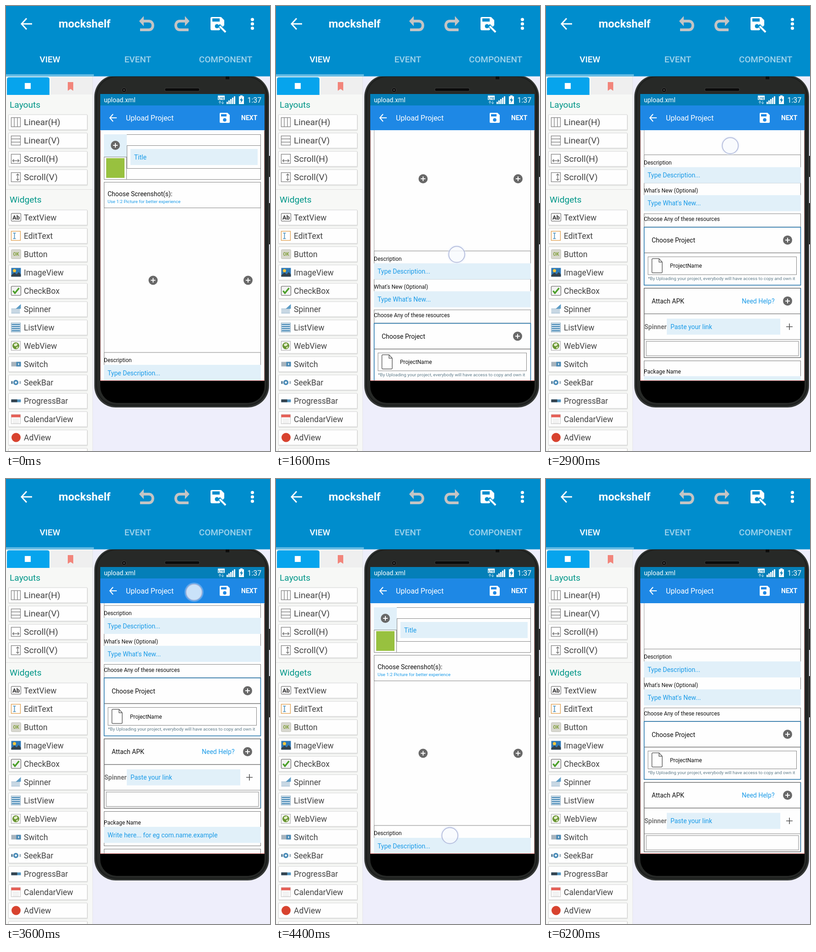
These frames come from a looping animation (577x971 px, 7700 ms). An HTML page:

```html
<!DOCTYPE html>
<html lang="en">
<head>
<meta charset="utf-8">
<title>Layout editor</title>
<style>
  html, body { margin: 0; width: 100%; height: 100%; overflow: hidden; background: #eeeefb; }
  svg { display: block; }
  text { font-family: Roboto, sans-serif; white-space: pre; }
</style>
</head>
<body>
<svg id="stage" width="577" height="971" viewBox="0 0 577 971"></svg>
<script>
const INK = '#111', HINT = '#1a9be8', FIELD = '#e1f0f9', LINE = '#858585', BLUE = '#2a78ad';

const rect = (x, y, w, h, fill, more = '') =>
  `<rect x="${x}" y="${y}" width="${w}" height="${h}" fill="${fill}" ${more}/>`;
const text = (x, y, s, size, fill = INK, more = '') =>
  `<text x="${x}" y="${y}" font-size="${size}" fill="${fill}" ${more}>${s}</text>`;
const dot = (x, y, r, fill, more = '') =>
  `<circle cx="${x}" cy="${y}" r="${r}" fill="${fill}" ${more}/>`;
const line = (d, stroke = LINE, w = 1, more = '') =>
  `<path d="${d}" fill="none" stroke="${stroke}" stroke-width="${w}" ${more}/>`;
const shape = (d, fill) => `<path d="${d}" fill="${fill}"/>`;
const box = (x1, y1, x2, y2, stroke = LINE, w = 1) =>
  rect(x1 + .5, y1 + .5, x2 - x1 - 1, y2 - y1 - 1, 'none', `stroke="${stroke}" stroke-width="${w}"`);
const plus = (x, y) => dot(x, y, 10, '#686868') +
  line(`M${x - 5} ${y}h10M${x} ${y - 5}v10`, '#fff', 2);
const field = (x, y, w, hint) => rect(x, y, w, 35, FIELD) + text(x + 8, y + 22.5, hint, 14, HINT);
const backArrow = (x, y, r, w) =>
  line(`M${x + r} ${y}H${x - r + 1}M${x} ${y - r}L${x - r + 1} ${y}L${x} ${y + r}`, '#fff', w);

function header() {
  const undo = shape('M291 33L301 22V44Z', '#c4c4c4') +
    line('M299 33H312C324 33 324 52 312 52H293', '#c4c4c4', 6);
  const tab = (x, s, alpha) => text(x, 122.5, s, 19, '#fff',
    `text-anchor="middle" font-weight="500" fill-opacity="${alpha}"`);
  return rect(0, 0, 577, 153.5, '#008dcd') + backArrow(45, 39, 12, 3) +
    text(115, 47, 'mockshelf', 24, '#fff', 'font-weight="700"') +
    undo + `<g transform="matrix(-1 0 0 1 692 0)">${undo}</g>` +
    shape('M450 24H470L477 31V42L466 53H450Q447 53 447 50V27Q447 24 450 24Z', '#fff') +
    rect(451, 27, 16, 7, '#008dcd') + dot(461, 44, 4.5, '#008dcd') +
    line('M465 42L478 55', '#008dcd', 7) + line('M467 44L480 57', '#fff', 4) +
    [29.5, 39, 48.5].map(y => dot(538.5, y, 3.6, '#fff')).join('') +
    tab(96, 'VIEW', 1) + tab(288, 'EVENT', .62) + tab(480, 'COMPONENT', .62) +
    rect(0, 149, 192, 4.5, '#66bce4');
}

// Icons are drawn around their own centre.
const frame = (fill = '#fff', stroke = '#888') =>
  rect(-10, -10, 20, 20, fill, `stroke="${stroke}" stroke-width="1.4"`);
const layouts = {
  'Linear(H)': frame() + line('M-3.5 -10V10M3.5 -10V10', '#888', 1.4),
  'Linear(V)': frame() + line('M-10 -3.5H10M-10 3.5H10', '#888', 1.4),
  'Scroll(H)': frame() + line('M-7 4H7M-4 1L-7 4L-4 7M4 1L7 4L4 7', '#777', 1.5),
  'Scroll(V)': frame() + line('M4 -7V7M1 -4L4 -7L7 -4M1 4L4 7L7 4', '#777', 1.5)
};
const widgets = {
  TextView: rect(-10, -9, 21, 17, '#fafafa', 'rx="2" stroke="#888" stroke-width="1.4"') +
    text(.5, 4.5, 'Ab', 13, '#333', 'text-anchor="middle" font-weight="700"'),
  EditText: frame('#fff', '#e0a458') + line('M-6 -6H0M-3 -6V6M-6 6H0', '#4b90bd', 1.6),
  Button: rect(-10, -10, 21, 20, '#d8d8cf', 'rx="2" stroke="#c2c2ba"') +
    text(.5, 3.5, 'OK', 10, '#86a343', 'text-anchor="middle" font-weight="700"'),
  ImageView: rect(-10, -10, 21, 19, '#2f79b5') + dot(-3, -4, 3.5, '#f5c63c') +
    shape('M-10 6L-3 0L2 4L6 -1L11 4V9H-10Z', '#33424e'),
  CheckBox: rect(-10, -10, 21, 20, '#f3f3f3', 'rx="2" stroke="#888" stroke-width="1.6"') +
    line('M-6 0L-2 5L7 -6', '#4a9f28', 3.5),
  Spinner: line('M-10 0H9M-10 4H9M-10 8H9', '#8fb0c8', 1.8) + shape('M0 -1L11 -11V-1Z', '#5c9cc5'),
  ListView: frame('#eaf3f9', '#9fb9ca') + line('M-9 -6.5H9M-9 -2H9M-9 2.5H9M-9 7H9', '#4688b5', 2.4),
  WebView: frame('#f7f7f7', '#bbb') + dot(0, 0, 7.5, '#689532') +
    shape('M-4 -4L2 -6L4 -2L0 1L-4 0ZM1 3L5 1L4 5L1 6Z', '#e3ecc8'),
  Switch: rect(-10, -5, 21, 10, '#a8b4bd') + rect(1, -5, 10, 10, '#4b8ab5') + rect(5, -2, 2, 4, '#fff'),
  SeekBar: rect(-10, -3, 3, 6, '#456f8d') + rect(8, -3, 3, 6, '#9cadb9') +
    dot(0, 0, 4, '#fff', 'stroke="#4d8db8" stroke-width="3.5"'),
  ProgressBar: rect(-10, -3, 21, 6, '#5194bf') + rect(-10, -3, 13, 6, '#33424e'),
  CalendarView: frame('#fff', '#cfcfcf') + rect(-10, -10, 20, 6, '#e55f56') +
    line('M-7 0H7M-7 4H7M-7 8H7', '#ddd', 1.4),
  AdView: dot(.5, 0, 10, '#d8432f')
};

function sidebar() {
  const card = y => rect(5, y + 1, 174, 35, '#000', 'rx="2" fill-opacity=".08"') +
    rect(5.5, y + .5, 172, 33, '#fefefe', 'rx="1" stroke="#d2d2d2"');
  const rows = (set, top, size) => Object.entries(set).map(([name, icon], i) => {
    const y = top + 40 * i;
    return card(y) + `<g transform="translate(21.5 ${y + 17})">${icon}</g>` +
      text(39, y + 23.5, name, size, '#444');
  }).join('');
  return rect(0, 153, 190, 818, '#f7f8f6') + rect(189, 153, 1, 818, '#e4e4e8') +
    rect(98, 156, 91, 37, '#efefef') +
    shape('M2 194V160Q2 155.500 7 155.500H90Q95 155.500 95 160V194Z', '#06a4ed') +
    rect(41, 168, 13, 13, '#fff') +
    shape('M135 166H147V185L141 181L135 185Z', '#f2857b') +
    text(8, 221.500, 'Layouts', 19.2, '#009688') + rows(layouts, 236.5, 19.2) +
    rect(0, 400, 189, 1, '#dedede') +
    text(8, 429, 'Widgets', 19.2, '#009688') + rows(widgets, 444.5, 17.6) + card(964.5);
}

function phone() {
  const bars = [0, 1, 2, 3, 4].map(i => rect(482 + 4 * i, 209 - 3 * i, 3, 5 + 3 * i, '#fff')).join('');
  return rect(573, 327, 4, 46, '#222') + rect(573, 430, 4, 90, '#222') +
    rect(193, 151, 382, 725, '#343735', 'rx="47"') +
    rect(196, 153, 376, 720, '#1c1e1d', 'rx="45"') +
    rect(199, 155, 370, 715, '#272927', 'rx="43"') +
    rect(206, 780, 359, 86, '#000', 'rx="36"') + rect(206, 780, 359, 40, '#000') +
    rect(480, 153, 8, 7, '#0c0d0c') +
    dot(258, 183.5, 5, '#111', 'stroke="#444"') + dot(258, 183.5, 1.8, '#4a4a4a') +
    rect(347, 179, 76, 7, '#0a0a0a', 'rx="3" stroke="#3c3c3c"') +
    rect(206, 192, 359, 25, '#047fb8') + text(214, 210, 'upload.xml', 14, '#fff') +
    rect(463, 195.500, 15, 9.500, '#fff') + text(470.5, 203.5, 'LTE', 8, '#047fb8', 'text-anchor="middle" font-weight="700"') +
    line('M467.500 214V208M465 210.500L467.500 207.500L470 210.500M473.500 207V213M471 210.500L473.500 213.500L476 210.500', '#8dc6e0', 1.3) +
    bars + rect(512, 195, 5, 3, '#fff') + rect(509, 197, 11, 17, '#fff') +
    shape('M516 199L511 206H514L513 212L518 204H515Z', '#047fb8') +
    text(527.5, 210.5, '1:37', 16, '#fff') +
    rect(206, 217, 359, 54.5, '#1e88e5') + backArrow(234, 244, 8, 2) +
    text(262, 249.500, 'Upload Project', 16, '#fff') +
    shape('M469 233H484L489 238V253Q489 255 487 255H469Q467 255 467 253V235Q467 233 469 233Z', '#fff') +
    rect(470, 236, 12, 5, '#1e88e5') + dot(478, 248.500, 3.8, '#1e88e5') +
    text(514, 249, 'NEXT', 14, '#fff', 'font-weight="700"');
}

function form() {
  return box(214, 280, 557, 379) + box(214, 329, 264, 379) + rect(214, 280, 50, 49, FIELD) + plus(239, 304) +
    rect(219, 332, 40, 43, '#98c13f') +
    box(264, 304, 557, 355) + field(272, 312, 278, 'Title') +
    box(214, 384, 557, 441) + text(222, 415, 'Choose Screenshot(s):', 14) +
    text(222, 430, 'Use 1:2 Picture for better experience', 9.9, HINT) +
    line('M214.500 441V756M556.500 441V756', '#a5a5a5') + plus(321.5, 598.5) + plus(529, 598.5) +
    box(214, 755.5, 557, 818) + text(214, 777, 'Description', 12) + field(214, 783, 343, 'Type Description...') +
    line('M214.500 818V844M556.500 818V844') + text(214, 838.5, "What's New (Optional)", 12) +
    field(214, 844, 343, "Type What's New...") +
    box(214, 884, 557, 914) + text(214, 900.5, 'Choose Any of these resources', 12) +
    box(214, 913.5, 557, 1041, BLUE, 1.6) + text(231, 947.5, 'Choose Project', 14) + plus(528, 942) +
    line('M215 970H556', '#777', 1.3) + box(222.5, 978, 548, 1018) +
    line('M233.500 982.500H247L254 990V1011.500Q254 1013.500 252 1013.500H233.500Q231.500 1013.500 231.500 1011.500V984.500Q231.500 982.500 233.500 982.500ZM247 982.500V990H254', '#666', 1.5) +
    text(271, 1002.5, 'ProjectName', 12) +
    text(223, 1029, '*By Uploading your project, everybody will have access to copy and own it', 9.9, '#607d8b') +
    box(214, 1046.5, 557, 1199, '#666', 1.4) + line('M556.500 1047V1198', BLUE, 1.4) +
    text(231, 1080, 'Attach APK', 14) + text(428, 1080, 'Need Help?', 14, HINT) + plus(528, 1075) +
    line('M215 1103H556', '#777', 1.3) + text(215, 1136, 'Spinner', 14, '#757575', 'font-weight="700"') +
    field(264, 1113.5, 248, 'Paste your link') + line('M525 1131H539M532 1124V1138', '#555', 1.6) +
    line('M215 1159H556') + box(218.5, 1162.5, 552.5, 1195) +
    box(214, 1205, 557, 1281, '#777') + text(214, 1233.5, 'Package Name', 12) +
    field(214, 1239, 343, 'Write here... for eg com.name.example') +
    box(214, 1287, 557, 1400, '#777');
}

const stage = document.getElementById('stage');
stage.innerHTML = rect(190, 153, 387, 818, '#eeeefb') + phone() +
  '<svg x="206" y="271" width="359" height="547" viewBox="206 271 359 547">' +
  rect(206, 271, 359, 547, '#fefefe') + `<g id="form">${form()}</g></svg>` +
  line('M206.500 272V817.500H564.500V272', '#e0a0a0') + line('M206 817.500H565', '#d45c5c') +
  sidebar() + header() +
  '<g id="touch">' + dot(0, 0, 21, '#dfe6fa', 'fill-opacity=".3"') +
  dot(0, 0, 17.5, '#fbfcff', 'fill-opacity=".7" stroke="#a9b2d6" stroke-width="2" stroke-opacity=".8"') + '</g>';

// time, finger x, finger y, scroll offset
const drag = [
  [600, 398, 768, 0], [1600, 395, 542, 221.5], [2400, 394, 376, 373.5], [3200, 408, 262, 466],
  [3600, 411, 247, 480], [4300, 384, 727, 0], [4400, 380, 778, 0], [5300, 403, 445, 335], [6100, 404, 395, 385]
];
const formNode = document.getElementById('form'), touch = document.getElementById('touch');

function pose(t) {
  const next = drag.findIndex(k => k[0] > t);
  if (next === 0) return drag[0];
  if (next < 0) return drag[drag.length - 1];
  const a = drag[next - 1], b = drag[next], p = (t - a[0]) / (b[0] - a[0]);
  return a.map((v, i) => v + (b[i] - v) * p);
}

function draw() {
  const t = Math.floor(performance.now() % 7700 / 100) * 100;
  const [, x, y, scroll] = pose(t);
  formNode.setAttribute('transform', `translate(0 ${-scroll})`);
  touch.setAttribute('transform', `translate(${x} ${y})`);
  touch.setAttribute('visibility', t >= 600 && t < 6200 ? 'visible' : 'hidden');
  requestAnimationFrame(draw);
}
draw();
</script>
</body>
</html>
```
